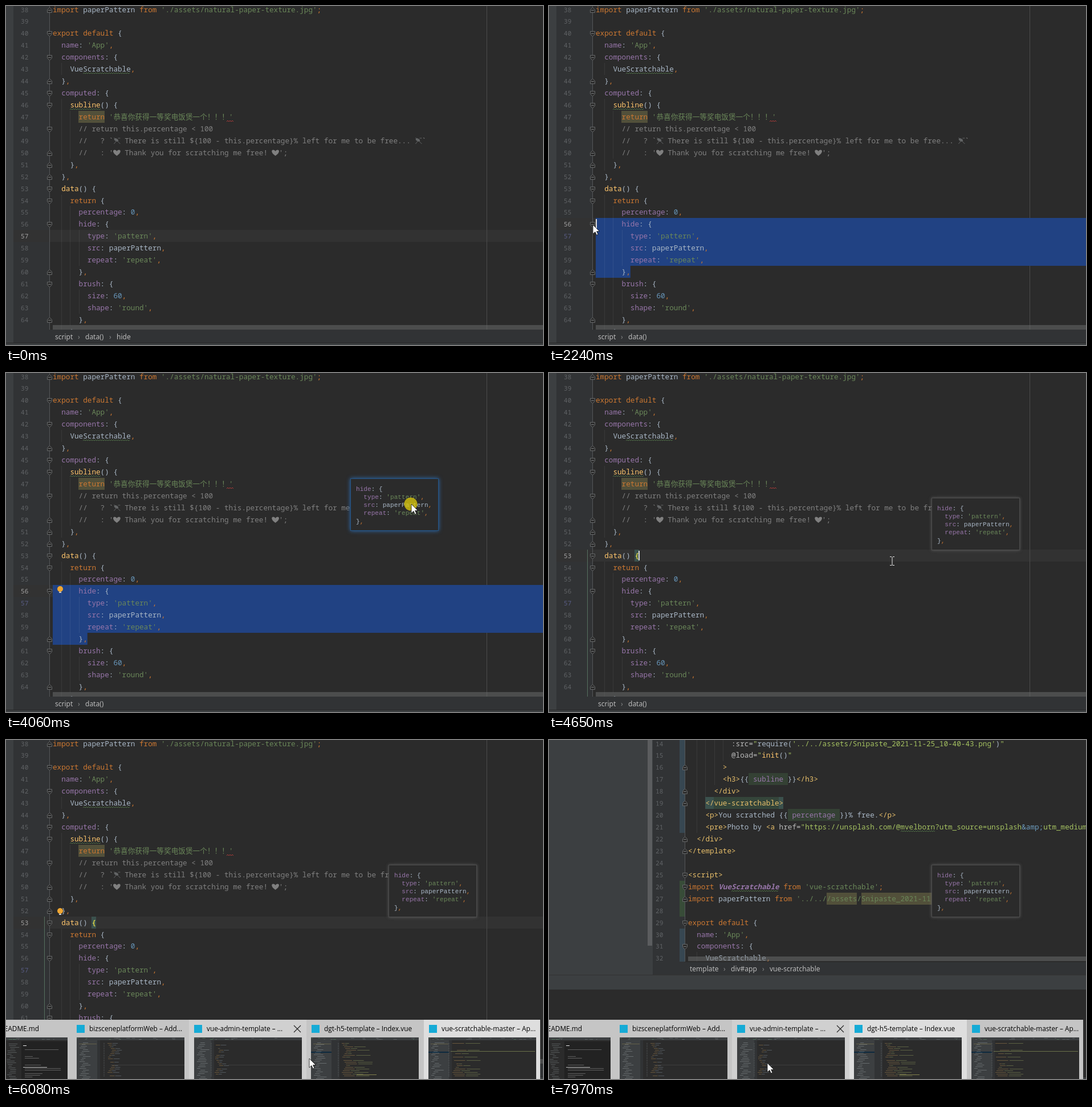
Recreate the animation shown at these times as an HTML page with a canvas. Size 942x595 px, loop 8 s.

```html
<!DOCTYPE html>
<html lang="en">
<head>
<meta charset="utf-8">
<title>Editor</title>
<style>
html, body { margin: 0; width: 100%; height: 100%; overflow: hidden; background: #2b2b2b; }
canvas { display: block; }
</style>
</head>
<body>
<canvas id="stage" width="942" height="595"></canvas>
<script>
const W = 942, H = 595, LOOP = 8000, CW = 7.6, ROW = 20.94;
const stage = document.getElementById('stage').getContext('2d');
let c = stage;

const MONO = '"Noto Sans Mono", "DejaVu Sans Mono", monospace';
const CODE = '12.667px ' + MONO, NUM = '11px ' + MONO;
const CJK = '12.667px "Noto Sans CJK SC", "Noto Sans CJK", sans-serif';
const NOTE = '11px "Liberation Mono", monospace';
const UI = '12px "Noto Sans", sans-serif', TITLE = '11.8px "Open Sans", sans-serif';

// "~x" starts a run in colour x
const INK = {
  k: '#cc7832', d: '#a9b7c6', s: '#6a8759', p: '#9876aa', n: '#6897bb', f: '#ffc66d',
  c: '#808080', t: '#e8bf6a', a: '#bababa', v: '#a5c261', e: '#6d9cbe', z: '#6a8759',
  r: '#626465', h: '#808080', y: '#ffef28', b: '#9876aa', l: '#5b93d0'
};
const WAVE = '#54764a';

const MAIN = {
  first: 38, x: 82, foldX: 76, numX: 26, bottom: 569,
  lines: [
    "~kimport ~dpaperPattern ~kfrom ~s'./assets/natural-paper-texture.jpg'~k;",
    "",
    "~kexport default ~d{",
    "~p  name~d: ~s'App'~k,",
    "~p  components~d: {",
    "~d    VueScratchable~k,",
    "~d  }~k,",
    "~p  computed~d: {",
    "~f    subline~d() {",
    "~k      return ~s'~z恭喜你获得一等奖电饭煲一个！！！~s'",
    "~c      // return this.percentage < 100",
    "~c      //   ? `~r ~c There is still ${100 - this.percentage}% left for me to be free... ~r ~c`",
    "~c      //   : '~h ~c Thank you for scratching me free! ~h ~c';",
    "~d    }~k,",
    "~d  }~k,",
    "~f  data~d() {",
    "~k    return ~d{",
    "~p      percentage~d: ~n0~k,",
    "~p      hide~d: {",
    "~p        type~d: ~s'pattern'~k,",
    "~p        src~d: paperPattern~k,",
    "~p        repeat~d: ~s'repeat'~k,",
    "~d      }~k,",
    "~p      brush~d: {",
    "~p        size~d: ~n60~k,",
    "~p        shape~d: ~s'round'~k,",
    "~d      }~k,",
    "~d    }~k,"
  ],
  opens: [40, 42, 45, 46, 48, 53, 54, 56, 61],
  closes: [38, 44, 50, 51, 52, 60, 64, 65],
  guides: [[2, 43, 43], [2, 46, 51], [4, 47, 50], [2, 54, 65], [4, 55, 64], [6, 57, 59], [6, 62, 63]]
};

const OTHER = {
  first: 14, x: 244, foldX: 238, numX: 187, bottom: 389,
  lines: [
    `~a          :src=~v"~drequire(~v'../../assets/Snipaste_2021-11-25_10-40-43.png'~d)~v"`,
    `~a          @load=~v"~finit~d()~v"`,
    "~t        >",
    "~t        <h3>~d{{ ~psubline ~d}}~t</h3>",
    "~t      </div>",
    "~t    </vue-scratchable>",
    "~t    <p>~dYou scratched {{ ~ppercentage ~d}}% free.~t</p>",
    `~t    <pre>~dPhoto by ~t<a ~ahref=~v"https://unsplash.com/@mvelborn?utm_source=unsplash~e&amp;~vutm_medium=referral`,
    "~t  </div>",
    "~t</template>",
    "",
    "~t<script>",
    "~kimport ~bVueScratchable ~kfrom ~s'vue-scratchable'~k;",
    "~kimport ~dpaperPattern ~kfrom ~s'../..//assets/Snipaste_2021-11-25_10-40-43.png'~k;",
    "",
    "~kexport default ~d{",
    "~p  name~d: ~s'App'~k,",
    "~p  components~d: {",
    "~d    VueScratchable~k,"
  ],
  opens: [25, 26, 29, 31],
  closes: [16, 18, 19, 22, 23, 27],
  guides: [[2, 14, 21], [4, 14, 18], [6, 14, 17], [8, 14, 15], [2, 32, 32]]
};

const NOTE_LINES = ["~phide~d: {", "~p  type~d: ~s'pattern'~k,", "~p  src~d: paperPattern~k,", "~p  repeat~d: ~s'repeat'~k,", "~d}~k,"];

const rowTop = (ed, n) => Math.round(ROW * (n - ed.first) - 4.5);
const box = (x, y, w, h, col) => { c.fillStyle = col; c.fillRect(x, y, w, h); };

function text(s, x, y, font, col, align = 'left') {
  c.font = font; c.letterSpacing = '0px'; c.textAlign = align;
  c.fillStyle = col; c.fillText(s, x, y);
  c.textAlign = 'left';
}

function mono(s, x, y, font, col, cw) {
  c.font = font; c.letterSpacing = '0px';
  c.letterSpacing = cw - c.measureText('0').width + 'px';
  c.fillStyle = col; c.fillText(s, x, y);
  c.letterSpacing = '0px';
}

function heart(x, y) {
  c.beginPath(); c.moveTo(x + 6, y + 1);
  c.bezierCurveTo(x - 6, y - 7, x + 2, y - 13, x + 6, y - 7);
  c.bezierCurveTo(x + 10, y - 13, x + 18, y - 7, x + 6, y + 1);
  c.fill();
}

function rose(x, y) {
  c.beginPath(); c.ellipse(x + 5, y - 6, 4, 2.4, 0.5, 0, 7); c.fill();
  c.strokeStyle = c.fillStyle; c.lineWidth = 1; c.beginPath();
  c.moveTo(x + 1, y - 10); c.lineTo(x + 12, y + 1);
  c.moveTo(x + 1, y + 1); c.lineTo(x + 5, y - 4);
  c.moveTo(x + 8, y - 9); c.lineTo(x + 12, y - 9); c.stroke();
}

function runs(line, x, y, font = CODE, cw = CW) {
  for (const run of line.split('~').slice(1)) {
    const key = run[0], s = run.slice(1), col = INK[key];
    c.fillStyle = col;
    if (key === 'z') { text(s, x, y, CJK, col); x += s.length * 12.667; }
    else if (key === 'r') { rose(x, y); x += 12.2; }
    else if (key === 'h') { heart(x, y); x += 12.2; }
    else { mono(s, x, y, key === 'b' ? 'italic bold ' + font : font, col, cw); x += s.length * cw; }
  }
}

function squiggle(x1, x2, y, col) {
  c.strokeStyle = col; c.lineWidth = .9; c.beginPath();
  for (let x = x1, i = 0; x <= x2; x += 2, i++) c.lineTo(x, y + (i % 2 ? -1 : 1));
  c.stroke();
}

function foldMark(x, y, open) {
  const s = open ? 1 : -1;
  c.beginPath();
  [[-4, -4], [4, -4], [4, 1], [0, 5], [-4, 1]].forEach(p => c.lineTo(x + .5 + p[0], y + .5 + p[1] * s));
  c.closePath();
  c.fillStyle = '#2b2b2b'; c.fill();
  c.strokeStyle = '#666869'; c.lineWidth = 1; c.stroke();
  box(x - 2, y, 5, 1, '#7a7c7d');
}

// Guides, numbers, text and fold marks; "under" paints backgrounds first.
function editor(ed, active, under) {
  c.save();
  c.beginPath(); c.rect(0, 0, W, ed.bottom); c.clip();
  under();
  for (const [col, a, b] of ed.guides)
    box(Math.round(ed.x + col * CW), rowTop(ed, a), 1, rowTop(ed, b + 1) - rowTop(ed, a), 'rgba(255,255,255,.07)');
  ed.lines.forEach((line, i) => {
    const n = ed.first + i, y = rowTop(ed, n);
    mono(String(n), ed.numX, y + 15, NUM, n === active ? '#a4a3a3' : n === 57 ? '#595d86' : '#606366', 6.7);
    runs(line, ed.x, y + 15);
  });
  box(ed.foldX, 0, 1, ed.bottom, '#555759');
  ed.opens.forEach(n => foldMark(ed.foldX, rowTop(ed, n) + 11, true));
  ed.closes.forEach(n => foldMark(ed.foldX, rowTop(ed, n) + 11, false));
  box(ed.x, ed.bottom - 9, W, 8, 'rgba(110,112,113,.5)');
  c.restore();
}

function crumbs(items, y) {
  items.forEach(([s, x], i) => {
    if (i) text('›', x - 13, y, UI, '#888a8b');
    text(s, x, y, UI, '#bbbbbb');
  });
}

function footer() {
  box(0, 591, W, 1, '#282828');
  box(0, 592, W, 3, '#3c3f41');
}

function bulb(x, y) {
  c.fillStyle = '#f0a732'; c.beginPath(); c.arc(x, y, 5, 0, 7); c.fill();
  box(x - 2, y + 5, 4, 2, '#c9c9c9');
}

const PRESS = 1150, NOTE_AT = 3260, CLICK = 4580;
const lineLen = n => MAIN.lines[n - 38].replace(/~./g, '').length;

// Selection head follows the pointer while dragging.
function headAt(t) {
  const p = pointer(Math.min(t, 2170));
  const n = Math.max(54, Math.min(60, Math.floor((p.y + 4.5) / ROW) + 38));
  const col = Math.max(0, Math.min(lineLen(n), Math.round((p.x - MAIN.x) / CW)));
  return { n, col };
}

function mainScreen(t) {
  const selecting = t >= PRESS && t < CLICK, done = t >= CLICK;
  const head = selecting ? headAt(t) : null;
  const active = done ? 53 : selecting ? head.n : 57;
  const top = n => rowTop(MAIN, n);
  box(0, 0, W, H, '#2b2b2b');
  box(13, 0, 63, 569, '#313335');
  editor(MAIN, active, () => {
    box(13, top(active), W, 21, '#323232');
    box(843, 0, 1, 569, '#4b4b4b');
    box(127, top(47), 46, 21, '#52503a');
    if (selecting) {
      const endX = MAIN.x + 8 * CW;
      for (let n = head.n; n <= 60; n++) {
        const a = n === head.n ? MAIN.x + head.col * CW : MAIN.x;
        const b = n === 60 ? endX : W;
        if (b > a) box(a, top(n), b - a, top(n + 1) - top(n), '#214283');
      }
    }
    if (done) {
      box(67, top(53), 1, 300, '#56705f');
      box(150, top(53), 8, 21, '#3b514d');
    }
  });
  squiggle(135, 218, 118, WAVE);
  squiggle(112, 166, 181, WAVE);
  squiggle(387, 400, 202, '#bc3f3c');
  if (done) mono('{', MAIN.x + 9 * CW, top(53) + 15, CODE, INK.y, CW);
  if (selecting && t < 2980) box(Math.round(MAIN.x + head.col * CW), top(head.n) + 2, 2, 17, '#dddddd');
  if (done && t < 5530) box(157, top(53) + 2, 2, 17, '#dddddd');
  if (t >= 3470 && !done) bulb(95, 379);
  if (t >= 5480) bulb(95, 300);
  box(0, 0, 13, 591, '#3c3f41');
  box(13, 568, W, 23, '#313335');
  const path = [['script', 86], ['data()', 139]];
  if (t < 1830) path.push(['hide', 194]);
  crumbs(path, 585);
  footer();
}

function otherScreen() {
  const top = n => rowTop(OTHER, n);
  box(0, 0, W, H, '#2b2b2b');
  box(182, 0, 56, 390, '#313335');
  editor(OTHER, 0, () => {
    box(229, 0, 9, top(22), '#374752');
    box(229, top(26), 9, 63, '#384c38');
    box(229, top(30), 9, 60, '#374752');
    box(350, top(17), 69, 21, '#344134');
    box(419, top(20), 91, 21, '#344134');
    box(274, top(19), 137, 21, '#34453a');
    box(274, top(19), 15, 21, '#3b514d');
    box(403, top(19), 8, 21, '#3b514d');
    box(487, top(27), 53, 21, '#52503a');
    box(548, top(27), 243, 21, '#52503a');
  });
  squiggle(320, 403, 265, WAVE);
  squiggle(617, 678, 160, WAVE);
  box(0, 0, 182, 412, '#3c3f41');
  box(173, 0, 8, 361, '#5b5d5f');
  box(182, 390, W, 22, '#313335');
  crumbs([['template', 247], ['div#app', 319], ['vue-scratchable', 387]], 406);
  box(0, 412, W, 1, '#323232');
  box(0, 413, W, 25, '#3c3f41');
  [['82', 517], ['99:8082', 538]].forEach(([s, y]) => {
    mono(s, 0.5, y, CODE, INK.l, CW);
    box(0, y + 2, s.length * CW + 1, 1, INK.l);
  });
  footer();
}

function note(t) {
  const k = Math.min(1, Math.max(0, (t - 4060) / 180));
  const x = t < 4000 ? 540 : Math.round(604 + 67 * k);
  const y = t < 4000 ? 109 : Math.round(185 + 34 * k);
  const focused = t < CLICK;
  c.save();
  c.shadowBlur = focused ? 7 : 5;
  c.shadowColor = focused ? 'rgba(47,127,216,.8)' : 'rgba(130,130,130,.6)';
  box(x, y, 155, 92, '#2b2b2b');
  c.restore();
  c.strokeStyle = focused ? '#245587' : '#4c4c4c';
  c.lineWidth = 1;
  c.strokeRect(x + .5, y + .5, 154, 91);
  NOTE_LINES.forEach((s, i) => runs(s, x + 10, Math.round(y + 21.5 + 14.3 * i), NOTE, 6.67));
}

const TITLES = ['', 'bizsceneplatformWeb – Add...', 'vue-admin-template – ...', 'dgt-h5-template – Index.vue', 'vue-scratchable-master – Ap...'];

// Tiny windows made of seeded dashes
function thumb(x, kind) {
  let seed = 17 + kind * 91;
  const rnd = () => (seed = (seed * 16807) % 2147483647) / 2147483647;
  const dash = (dx, y, w, col, alpha = .45) => {
    c.globalAlpha = alpha;
    box(x + dx, y, w, 1, col);
    c.globalAlpha = 1;
  };
  box(x, 522, 189, 73, '#2b2b2b');
  box(x, 522, 189, 5, '#3c3f41');
  for (let i = 0; i < 16; i++) dash(rnd() * 180, 523 + 2 * (i % 2), 2 + rnd() * 5, i % 5 ? '#777a7c' : '#5d9a68');
  if (kind === 0) {
    for (let y = 533; y < 595; y += 3) dash(82 + rnd() * 8, y, 5 + rnd() * 13, '#8a9296');
    box(x + 108, 529, 81, 66, '#222222');
    for (let y = 543; y < 594; y += 3) if (rnd() < .7) dash(114, y, 10 + rnd() * 55, '#bbbbbb', .4);
    dash(111, 536, 6, '#ffffff', .9);
    dash(111, 574, 42, '#ffffff', .7);
    return;
  }
  const tree = kind === 2 ? 30 : 36;
  box(x, 527, tree, 68, '#3c3f41');
  if (kind !== 2) dash(4, 533, 31, '#a39455', .4);
  if (kind > 2) box(x, 547, tree, 2, '#0d293e');
  for (let y = 531; y < 595; y += 3) dash(5 + (y % 4) * 2, y, 5 + rnd() * 12, '#9a9fa2');
  box(x + tree, 527, kind === 3 ? 14 : 5, 68, '#313335');
  const left = [0, 54, 36, 54, 42][kind], long = kind > 2 ? 55 : 20;
  for (let y = 532; y < 592; y += 3) {
    const dx = left + Math.abs((y * 5) % 17 - 8), w = 3 + rnd() * long;
    dash(left - 7, y, 2, '#777c7e');
    if (rnd() < .25) continue;
    dash(dx, y, w * .4, '#b08a50');
    dash(dx + w * .45, y, w * .5, kind > 2 ? '#94a060' : '#7f8c98');
  }
  if (kind === 3) dash(80, 587, 35, '#a5a35a', .7);
  if (kind === 4) dash(39, 546, 148, '#94a060', .6);
  if (kind < 3) dash(60, 570, 129, '#555555');
}

const thumbs = document.createElement('canvas');
thumbs.width = W; thumbs.height = H;
c = thumbs.getContext('2d');
for (let i = 0; i < 5; i++) thumb(-81 + Math.round(205.4 * i), i);
c = stage;

function switcher(t, start, current) {
  const hover = Math.floor((pointer(t).x - 8 + 91) / 206);
  c.save();
  c.globalAlpha = Math.min(1, .45 + (t - start) / 130);
  for (let i = 0; i < 5; i++) {
    const x = -91 + 206 * i, w = i === 4 ? 204 : 206;
    box(x, 491, w, 104, i === current ? '#dedede' : i === hover ? '#d0d0d0' : '#c5c5c5');
    if (!i) { text('README.md', 58, 511, TITLE, '#000', 'right'); continue; }
    box(x + 9, 500, 14, 14, '#16abd6');
    text(TITLES[i], x + 31, 511, TITLE, '#000');
    if (i === hover && i === 2) {
      c.strokeStyle = '#222'; c.lineWidth = 1.1; c.beginPath();
      c.moveTo(505, 501); c.lineTo(517, 513);
      c.moveTo(517, 501); c.lineTo(505, 513); c.stroke();
    }
  }
  c.drawImage(thumbs, 0, 0);
  c.restore();
}

// Pointer key points: time, x, y
const PATH = [
  [130, 776, 568], [400, 560, 530], [640, 310, 470], [880, 175, 445], [950, 170, 450],
  [1090, 145, 467], [1160, 143, 467], [1400, 112, 410], [1620, 84, 343], [1760, 80, 345],
  [1970, 77, 386], [2100, 77, 384], [2380, 77, 384], [2560, 104, 398], [3400, 104, 398],
  [3600, 330, 290], [3860, 647, 154], [3980, 647, 154], [4050, 711, 230], [4060, 711, 230],
  [4240, 778, 264], [4310, 778, 264], [4580, 602, 329], [4650, 602, 331], [4840, 602, 331],
  [5120, 132, 600], [5670, 215, 600], [5810, 330, 560], [5950, 430, 530], [6080, 532, 559],
  [6200, 610, 482], [6410, 584, 552], [6820, 584, 552], [7160, 185, 602], [7830, 290, 600],
  [7900, 345, 580], [7970, 383, 567], [8000, 383, 567]
];

function pointer(t) {
  const s = Math.max(130, 130 + Math.floor((t - 130) / 70) * 70);
  const i = Math.max(1, PATH.findIndex(p => p[0] >= s));
  const [t0, x0, y0] = PATH[i - 1], [t1, x1, y1] = PATH[i];
  const k = (s - t0) / (t1 - t0), e = k * k * (3 - 2 * k);
  return { x: Math.round(x0 + (x1 - x0) * e), y: Math.round(y0 + (y1 - y0) * e) };
}

function drawPointer(t, panel) {
  if (t < 130) return;
  const { x, y } = pointer(t);
  const held = (t >= PRESS && t < 2100) || (t >= 3990 && t < 4280) || (t >= 4540 && t < 4640);
  const overNote = t >= 3800 && t < 4380;
  if (held) {
    c.fillStyle = 'rgba(214,196,14,.8)';
    c.beginPath(); c.arc(x - 1, y, 11.5, 0, 7); c.fill();
  }
  if (x >= 82 && y < 568 && !panel && !overNote && t < 6490) {
    box(x - .5, y - 7, 1, 15, '#e8e8e8');
    for (const dy of [-8, 7]) {
      box(x - 4, y + dy, 3, 1, '#e8e8e8');
      box(x + 1, y + dy, 3, 1, '#e8e8e8');
    }
    return;
  }
  c.beginPath();
  [[0, 0], [0, 16], [4, 12.5], [6.5, 18], [9, 17], [6.6, 11.5], [11.5, 11.5]].forEach(p => c.lineTo(x + p[0], y + p[1]));
  c.closePath();
  c.fillStyle = '#fff'; c.fill();
  c.strokeStyle = '#111'; c.lineWidth = .8; c.stroke();
}

function draw(t) {
  const first = t >= 5670 && t < 6550, second = t >= 7830;
  if (t < 6490) mainScreen(t); else otherScreen();
  if (t >= NOTE_AT) note(t);
  if (first) switcher(t, 5670, t < 6490 ? 4 : 3);
  if (second) switcher(t, 7830, 3);
  drawPointer(t, first || second);
}

const began = performance.now();
function tick() {
  draw((performance.now() - began) % LOOP);
  requestAnimationFrame(tick);
}
tick();
</script>
</body>
</html>
```
